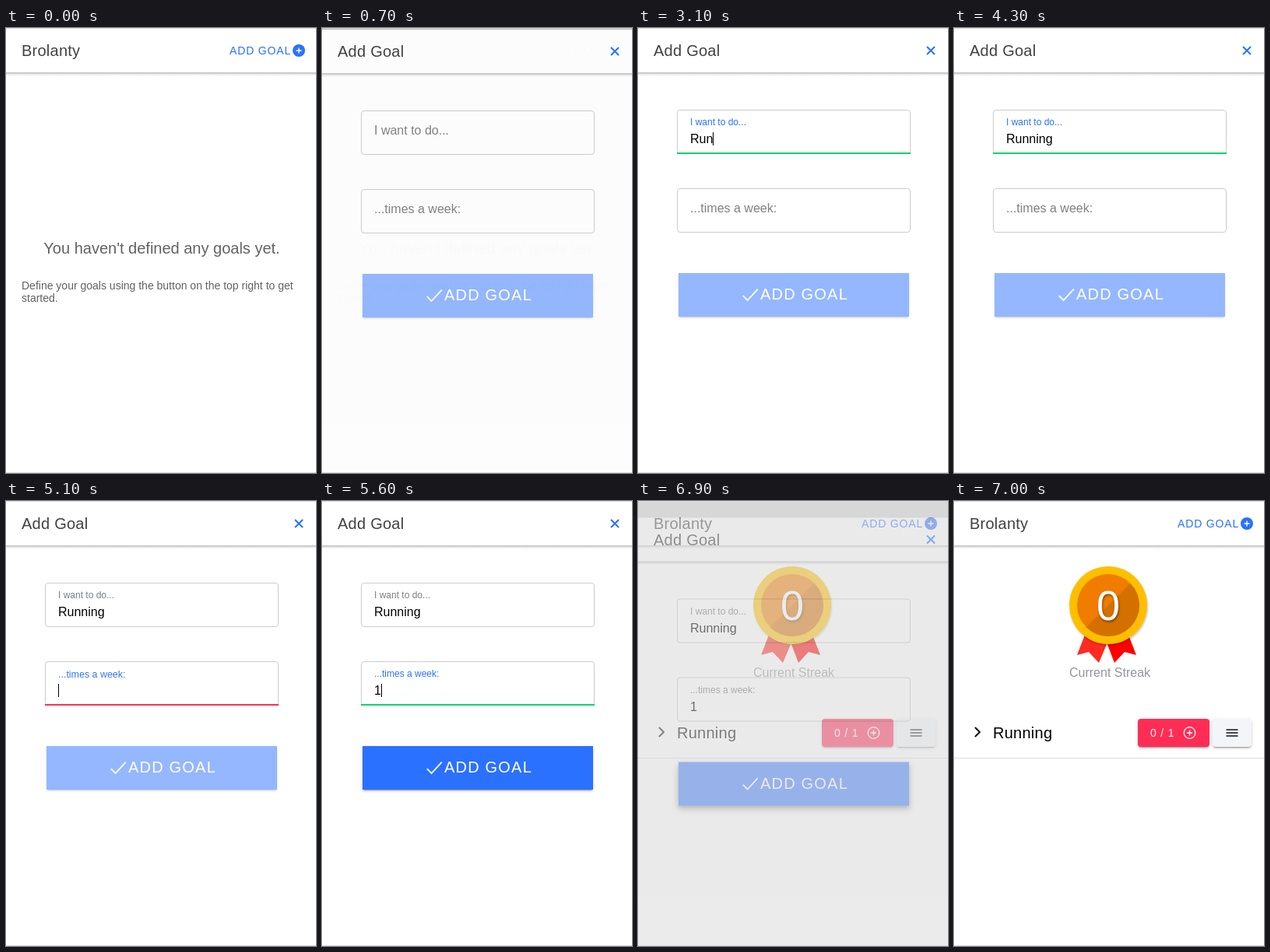
Recreate the animation shown at these times as an HTML page. Size 398 px wide and 572 px high, loop 8000 ms.

```html
<!DOCTYPE html>
<html lang="en">
<head>
<meta charset="utf-8">
<title>Goal tracker</title>
<style>
  :root { --blue: #2b71ff; --red: #ff2d55; --green: #0cd46a; --grey: #808080; }
  html, body { margin: 0; width: 100%; height: 100%; overflow: hidden; background: #fff; }
  body { font-family: "Liberation Sans", Arial, sans-serif; }
  div, svg, i { position: absolute; box-sizing: border-box; }
  #stage { left: 0; top: 0; width: 398px; height: 572px; overflow: hidden; background: #fff; }
  .layer, .layer > svg { left: 0; top: 0; width: 398px; height: 572px; }
  .layer > svg { fill: none; }
  .line { left: 0; width: 398px; height: 1px; background: #ddd; }
  .text { white-space: pre; }
  .title { letter-spacing: .0125em; }
  .caps { letter-spacing: .06em; }
  .center { left: 0 !important; width: 400px; text-align: center; }
  .header { top: 1px; width: 398px; height: 56px; background: #fff; }
  .header::after {
    content: ""; position: absolute; top: 56px; width: 100%; height: 5px;
    background: linear-gradient(rgba(0,0,0,.27), rgba(0,0,0,.16) 30%, rgba(0,0,0,.05) 65%, transparent);
  }
  #shade { background: #000; }
  #modal { background: #fff; clip-path: inset(1px 0 0 0); }
  .field { left: 50px; width: 300px; height: 57px; border: 1px solid #ccc; border-radius: 4px; }
  .underline { left: 50px; width: 300px; height: 2px; }
  .label { transform-origin: 0 14px; }
  .value i { width: 1px; height: 17px; background: #000; }
  .button {
    border-radius: 4px;
    box-shadow: 0 3px 1px -2px rgba(0,0,0,.2), 0 2px 2px rgba(0,0,0,.14), 0 1px 5px rgba(0,0,0,.12);
  }
  #submit { left: 52px; top: 315px; width: 296px; height: 56px; border-radius: 0; background: var(--blue); overflow: hidden; }
  #submit.pressed { box-shadow: 0 3px 5px rgba(0,0,0,.25), 0 4px 10px 1px rgba(0,0,0,.2); }
  #ripple { border-radius: 50%; background: rgba(255,255,255,.2); transform: translate(-50%, -50%); left: 140.5px; top: 33px; }
  #press { left: 279px; top: 13px; width: 113px; height: 32px; border-radius: 4px; background: rgba(43,113,255,.08); }
</style>
</head>
<body>
<div id="stage"></div>
<script>
// Places text by its left edge and baseline.
function text(x, baseline, size, content, color, attrs = 'class="text"') {
  const ascent = Math.round(size * .905), height = ascent + Math.round(size * .212);
  return `<div ${attrs} style="left:${x}px;top:${baseline - ascent}px;font-size:${size}px;` +
    `line-height:${height}px;color:${color}">${content}</div>`;
}
const title = (name) => '<div class="header"></div>' + text(20, 36, 20, name, '#424242', 'class="text title"');
const field = (n, label) => {
  const y = 105 + 101 * n;
  return `<div class="field" style="top:${y}px"></div>
    <div class="underline" id="underline${n}" style="top:${y + 55}px"></div>` +
    text(67, y + 31, 16, label, 'var(--grey)', `id="label${n}" class="text label"`) +
    text(67, y + 43, 16, '', '#000', `id="value${n}" class="text value"`);
};

const stage = document.getElementById('stage');
stage.innerHTML = `
  <div class="layer">
    ${title('Brolanty')}
    <div id="press"></div>
    ${text(287, 34, 14, 'ADD GOAL', 'var(--blue)', 'class="text caps"')}
    <svg><circle cx="376" cy="29" r="8" fill="var(--blue)"/>
      <path d="M372.5 29h7M376 25.5v7" stroke="#fff" stroke-width="1.4"/></svg>
    <div class="layer" id="empty">
      ${text(0, 290, 20, "You haven't defined any goals yet.", '#626262', 'class="text center"')}
      ${text(20, 336, 14, 'Define your goals using the button on the top right to get\nstarted.', '#626262')}
    </div>
    <div class="layer" id="goals">
      <svg>
        <path d="M168 172L158 198L173 194L186 208L197 182Z" fill="#ff2a22"/>
        <path d="M224 172L234 198L219 194L206 208L196 182Z" fill="#f00"/>
        <circle cx="198" cy="134" r="50" fill="#ffbf00" style="filter:drop-shadow(1px 2px 1px rgba(0,0,0,.2))"/>
        <circle cx="198" cy="134" r="40" fill="#f07d00"/>
        <path d="M169.7 162.3A40 40 0 0 0 226.3 105.7Z" fill="#d47000"/>
        <path d="M27 291l6 6-6 6" stroke="#111" stroke-width="2"/>
      </svg>
      ${text(183, 153, 54, '<span style="text-shadow:1px 2px 3px rgba(0,0,0,.4)">0</span>', '#fff')}
      ${text(148, 226, 16, 'Current Streak', '#92949c')}
      ${text(50, 305, 20, 'Running', '#000', 'class="text title"')}
      <div class="button" style="left:236px;top:280px;width:92px;height:36px;background:var(--red)"></div>
      <div class="button" style="left:332px;top:280px;width:50px;height:36px;background:#f4f5f8"></div>
      ${text(252, 303, 14, '0 / 1', '#fff', 'class="text caps"')}
      <svg stroke-width="1.3">
        <circle cx="302.5" cy="298" r="7.3" stroke="#fff"/>
        <path d="M299 298h7M302.5 294.5v7" stroke="#fff"/>
        <path d="M349.5 294h15M349.5 298h15M349.5 302h15" stroke="#111"/>
      </svg>
      <div class="line" style="top:330px"></div>
    </div>
  </div>
  <div class="layer" id="shade"></div>
  <div class="layer" id="modal">
    ${title('Add Goal')}
    ${field(0, 'I want to do...')}
    ${field(1, '...times a week:')}
    <div class="button" id="submit"><div id="ripple"></div></div>
    ${text(157, 349, 20, 'ADD GOAL', '#fff', 'class="text caps"')}
    <svg><path d="M371 24l10 10M381 24l-10 10" stroke="var(--blue)" stroke-width="2"/>
      <path d="M134.8 344.2L140.6 350L153.8 335.6" stroke="#fff" stroke-width="1.8"/></svg>
  </div>
  <div class="line" style="top:0"></div>
  <div class="line" style="top:571px"></div>`;

const $ = (id) => document.getElementById(id);

function bezier(x1, y1, x2, y2) {
  const at = (a, b, s) => 3 * a * s * (1 - s) ** 2 + 3 * b * s * s * (1 - s) + s ** 3;
  return (x) => {
    if (x <= 0 || x >= 1) return x <= 0 ? 0 : 1;
    let low = 0, high = 1;
    for (let i = 0; i < 24; i++) {
      const mid = (low + high) / 2;
      if (at(x1, x2, mid) < x) low = mid; else high = mid;
    }
    return at(y1, y2, low);
  };
}
const easeIn = bezier(.47, 0, .745, .715);
const easeOut = bezier(.36, .66, .04, 1);
const easeInOut = bezier(.42, 0, .58, 1);

const LOOP = 8000, STEP = 100;
const inputs = [
  { shown: 1800, focus: 1680, blur: 4985, leave: 5000, word: 'Running',
    keys: [2600, 2900, 3100, 3200, 3400, 3700, 3800], blinks: [1800, 2200, 2600, 4300, 4800] },
  { shown: 5000, focus: 4985, blur: 6725, leave: 6800, word: '1',
    keys: [5600], blinks: [5000, 5500, 5600, 6100, 6600] },
];

function drawInput(input, n, t) {
  const progress = (from) => easeInOut((t - from) / 150);
  const floated = t < input.shown ? 0 : progress(input.focus);
  const blue = t < input.shown ? 0 : floated - (t < input.leave ? 0 : progress(input.blur));
  const focused = t >= input.shown && t < input.leave;
  const typed = input.keys.filter((key) => t >= key).length;
  const caret = focused && input.blinks.filter((blink) => t >= blink).length % 2 === 1;
  const label = $('label' + n);
  label.style.transform = floated ? `translateY(${-11 * floated}px) scale(${1 - floated / 4})` : 'none';
  label.style.color = `color-mix(in srgb, var(--blue) ${blue * 100}%, var(--grey))`;
  $('value' + n).innerHTML = input.word.slice(0, typed) + (caret ? '<i></i>' : '');
  $('underline' + n).style.background = focused ? `var(--${typed ? 'green' : 'red'})` : 'none';
}

function draw(t) {
  const entered = t < 600 ? 0 : easeOut((t - 523) / 280);
  const left = easeIn((t - 6767) / 200);
  const opacity = entered * (1 - left);
  $('modal').style.opacity = opacity;
  $('modal').style.transform = `translateY(${40 * (1 - entered + left)}px)`;
  $('shade').style.opacity = .32 * opacity;
  $('press').hidden = t < 500 || t >= 700;
  $('empty').hidden = t >= 6700;
  $('goals').hidden = t < 6700;

  inputs.forEach((input, n) => drawInput(input, n, t));

  const pressed = t >= 6800;
  $('submit').style.opacity = t < 5600 ? .5 : 1;
  $('submit').className = pressed ? 'button pressed' : 'button';
  $('ripple').style.width = $('ripple').style.height = (pressed ? 240 + (t - 6800) * 1.6 : 0) + 'px';
}

const start = performance.now();
function tick() {
  const t = (performance.now() - start) % LOOP;
  draw(Math.floor(t / STEP) * STEP);
  requestAnimationFrame(tick);
}
tick();
</script>
</body>
</html>
```
